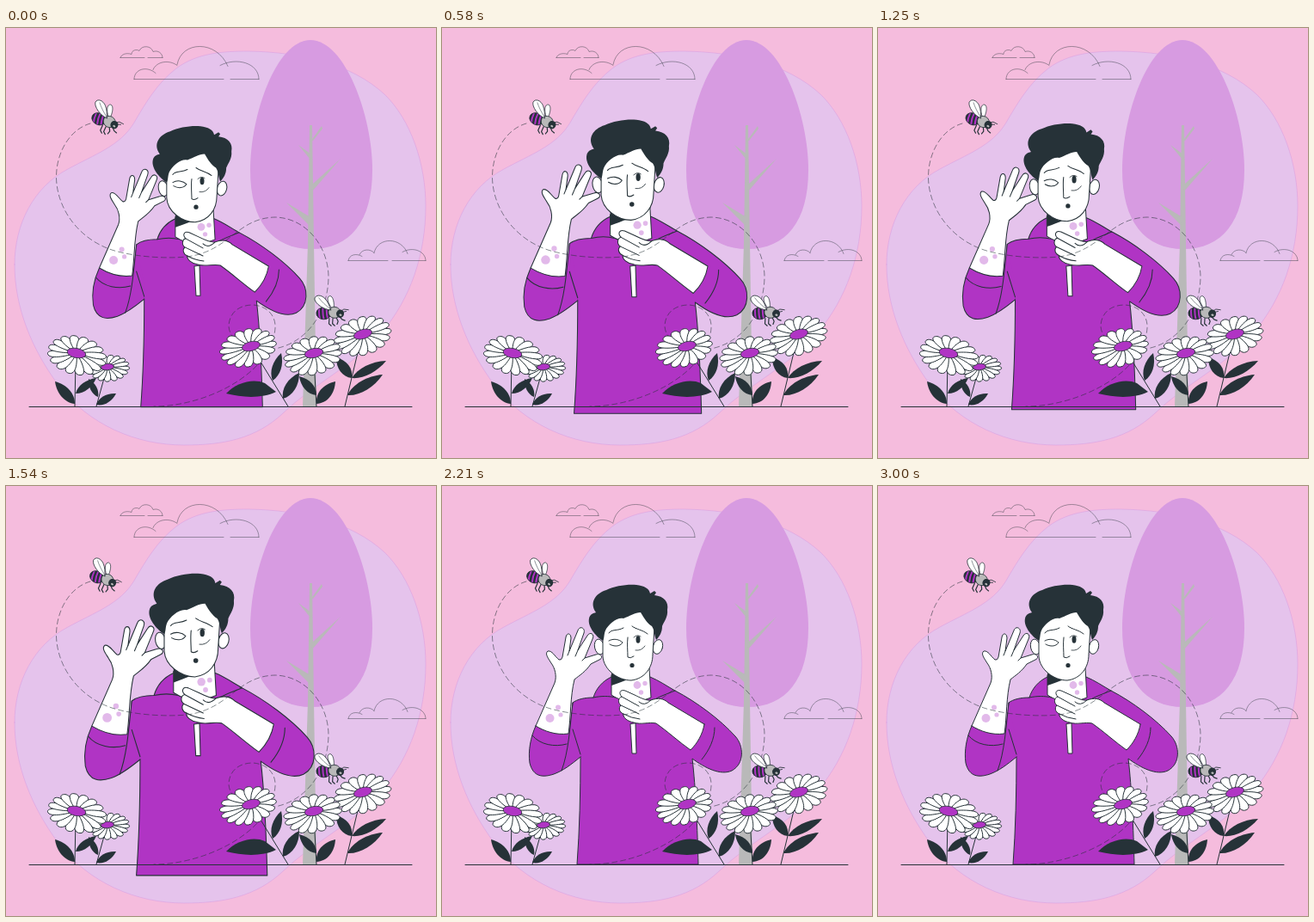
An HTML page with a canvas that plays this animation: 500 px wide and 500 px high, repeating every 3.04 s.

```html
<!DOCTYPE html>
<html lang="en">
<head>
<meta charset="utf-8">
<title>Allergy</title>
<style>
html, body { margin: 0; width: 100%; height: 100%; overflow: hidden; background: #f5bcdd; }
canvas { display: block; width: 100vw; height: 100vh; }
</style>
</head>
<body>
<canvas id="stage"></canvas>
<script>
const LOOP = 3040;
const DARK = '#263238', WHITE = '#fff', PURPLE = '#b034c4', LILAC = '#d79be1', RASH = '#e2b9ea', GREY = '#b9b9b9';
const canvas = document.getElementById('stage');
const ctx = canvas.getContext('2d');
const ratio = Math.max(1, window.devicePixelRatio || 1);
canvas.width = canvas.height = 500 * ratio;

function shape(d, fill, stroke, width = 1) {
  const p = new Path2D(d);
  if (fill) { ctx.fillStyle = fill; ctx.fill(p); }
  if (stroke) { ctx.strokeStyle = stroke; ctx.lineWidth = width; ctx.stroke(p); }
}
const line = (d, width = 1) => shape(d, null, DARK, width);

function oval(x, y, rx, ry, fill, rot = 0, width = 0) {
  ctx.beginPath();
  ctx.ellipse(x, y, rx, ry, rot, 0, Math.PI * 2);
  ctx.fillStyle = fill;
  ctx.fill();
  if (width) { ctx.strokeStyle = DARK; ctx.lineWidth = width; ctx.stroke(); }
}
const dot = (x, y, r, fill) => oval(x, y, r, r, fill);

// Piecewise linear value through [time, value] points
function track(points, t) {
  for (let i = 1; i < points.length; i++) {
    const [a, va] = points[i - 1], [b, vb] = points[i];
    if (t <= b) return va + (vb - va) * Math.max(0, t - a) / (b - a);
  }
  return points[points.length - 1][1];
}
const BEAT = [[0, 1], [300, 1.1], [900, 1], [1200, 1], [1500, 1.1], [1800, 1]];
const SHAKE = [0, -1, 2, -4, 4, -4, 4, -4, 2, -1, 0].map((x, i) => [i * 300, x]);

function backdrop() {
  ctx.fillStyle = '#f5bcdd';
  ctx.fillRect(0, 0, 500, 500);
  shape('M10 275C10 228 32 185 72 164C103 147 133 137 149 110C163 86 176 64 198 47C222 29 252 27 282 27' +
    'C344 28 402 42 440 77C471 107 488 158 488 207C488 264 470 315 437 354C406 392 357 414 322 448' +
    'C290 478 252 485 207 485C152 485 96 462 60 414C30 373 10 325 10 275Z', '#e5c3ec', LILAC, 0.5);
  ctx.save();
  ctx.translate(0, 0.5);
  ctx.globalAlpha = 0.42;
  line('M133 34C134 30 140 28 146 30C146 25 152 24 155 26C158 19 169 20 171 27C177 25 182 29 182 34M133 34H161M165 34H182');
  line('M149 59C149 47 164 43 174 52M171 48C175 38 190 36 199 43M199 42C204 14 245 13 258 44M249 43C268 33 294 40 294 59M149 59H253M261 59H294');
  line('M398 270C399 263 407 261 414 265M411 263C414 256 424 256 428 261M428 261C432 242 460 242 467 262M461 260C473 253 488 259 488 270M398 270H444M449 270H488');
  ctx.restore();
}

function tree() {
  shape('M354 14C394 14 426 102 426 165C426 225 400 257 355 257C310 257 284 225 284 165C284 102 314 14 354 14Z', LILAC);
  shape('M353 113H356L358 250L361 440H345L351 250Z', GREY);
  shape('M354 132L367 114L368 117L357 131Z', GREY);
  shape('M354 153L340 136L355 147Z', GREY);
  shape('M355 191L389 152L357 181Z', GREY);
  shape('M352 229L326 203L354 220Z', GREY);
}

function shirt() {
  shape('M197 222C186 227 179 236 176 246C166 246 157 248 152 252L150 290L161 315C161 355 160 400 157 440H298' +
    'C297 400 295 350 291 317C306 328 324 337 337 331C352 323 351 302 341 291C324 272 296 251 271 238C262 233 252 226 242 222Z',
    PURPLE, DARK);
  shape('M109 279C103 292 100 308 102 322C106 339 118 339 130 335C141 331 150 324 161 315L161 298L152 252L147 288Z', PURPLE);
  line('M109 279C103 292 100 308 102 322C106 339 118 339 130 335C141 331 150 324 161 315');
  line('M152 252C149 280 147 310 139 331');
  line('M152 283L161 312');
  line('M105 290C114 301 131 304 145 300');
  line('M176 246C185 244 194 244 202 246M271 238C261 242 252 245 246 249');
  line('M317 281C317 294 311 307 302 318');
  shape('M219 277L221 311H226L225 276Z', WHITE, DARK);
}

function face() {
  shape('M197 220L197 243C206 249 217 252 229 251L243 246L241 211Z', WHITE, DARK);
  shape('M197 216L216 225C210 227 204 230 197 232Z', DARK);
  oval(183, 187, 5.5, 9, WHITE, -0.2, 1);
  oval(251, 187, 5.5, 8.5, WHITE, 0.25, 1);
  shape('M187 168L187 198C188 214 205 226 220 226C236 224 245 211 245 196L247 164L231 140L200 145Z', WHITE, DARK);
  shape('M187 180C178 174 169 163 171 154C172 149 176 148 179 147C171 136 178 125 191 121C201 116 216 114 226 115' +
    'C235 116 241 119 242 125L247 122L249 124L247 127C258 128 264 135 262 144C263 152 258 158 256 163C256 170 253 175 249 179' +
    'C247 174 247 167 244 163C239 160 235 154 231 147C224 147 219 151 211 154C204 152 193 161 190 168C188 173 189 177 187 180Z', DARK);
  line('M194 171C197 166 204 169 211 165M221 163C226 167 233 167 239 172');
  line('M194 180C199 177 206 178 210 182C207 187 200 187 195 184');
  line('M216 176C215 184 216 192 216 199Q219 201 223 198');
  line('M223 176Q227 172 231 175M225 191Q232 192 236 186', 0.8);
  oval(228, 178.5, 2.5, 4.2, DARK);
  oval(221, 208.5, 2.6, 2.6, DARK);
  dot(227, 231.5, 4.4, RASH);
  dot(236, 229.5, 2.7, RASH);
  dot(231.5, 240, 2.7, RASH);
}

function hands() {
  shape('M109 279L131 229C134 221 131 211 127 206C124 201 119 195 123 192C128 191 131 198 136 202Q139 203 140 199' +
    'L144 176C145 170 150 171 150 177L148 192L158 168C160 162 167 165 165 171L158 191L169 174C172 169 178 172 175 178' +
    'L166 200L179 196C185 194 188 200 183 202L173 207C167 216 160 220 154 225C149 245 150 267 147 288C132 290 119 285 109 279Z',
    WHITE, DARK);
  line('M148 192L146 197M158 191L155 198M166 200L163 203');
  dot(125.5, 270, 5, RASH);
  dot(135, 257.5, 3, RASH);
  dot(138, 266, 2.6, RASH);
  shape('M305 277L263 252C258 247 251 246 243 249C238 250 230 246 224 243L213 238C207 236 205 241 209 245' +
    'C205 246 204 252 208 255C205 258 206 263 211 265C210 269 216 274 223 275C231 278 241 274 249 276' +
    'C262 285 276 298 289 307C297 299 303 289 305 277Z', WHITE, DARK);
  line('M209 245L229 256M208 255L229 265M211 265Q220 270 230 271M229 251Q235 257 243 249');
}

function man(scale) {
  ctx.save();
  ctx.translate(225, 277.5);
  ctx.scale(scale, scale);
  ctx.translate(-225, -277.5);
  shirt();
  face();
  hands();
  ctx.restore();
}

function trail() {
  ctx.save();
  ctx.globalAlpha = 0.55;
  ctx.setLineDash([6, 4]);
  line('M98 111C74 118 58 145 58.5 175C60 215 90 250 130 260C157 267 190 268 210 266C260 260 268 221 313 220' +
    'C350 221 375 255 375 290C374 338 342 373 302 374C272 374 259 359 259 346C260 330 272 322 287 322' +
    'C304 323 314 335 313 349C309 402 232 440 172 440');
  ctx.restore();
}

function leaf(x0, y0, x1, y1, w) {
  const dx = x1 - x0, dy = y1 - y0, len = Math.hypot(dx, dy);
  const nx = -dy / len * w, ny = dx / len * w;
  const side = s => [x0 + dx * 0.25 + nx * s, y0 + dy * 0.25 + ny * s, x0 + dx * 0.65 + nx * s, y0 + dy * 0.65 + ny * s];
  ctx.beginPath();
  ctx.moveTo(x0, y0);
  ctx.bezierCurveTo(...side(1), x1, y1);
  const [a, b, c, d] = side(-1);
  ctx.bezierCurveTo(c, d, a, b, x0, y0);
  ctx.fillStyle = DARK;
  ctx.fill();
}

// The ring of petal tips sits (ox, oy) away from the flower's heart
function flower(x, y, r, rot, ox, oy) {
  const count = 16, squash = 0.65, w = r * 0.2;
  for (let i = 0; i < count; i++) {
    const angle = (i + 0.4) * Math.PI * 2 / count;
    const tx = r * Math.cos(angle) + ox, ty = r * Math.sin(angle) + oy / squash;
    const len = Math.hypot(tx, ty);
    ctx.save();
    ctx.translate(x, y);
    ctx.rotate(rot);
    ctx.scale(1, squash);
    ctx.rotate(Math.atan2(ty, tx));
    ctx.beginPath();
    ctx.moveTo(0, 0);
    ctx.bezierCurveTo(len * 0.45, -w * 0.8, len, -w * 1.3, len, 0);
    ctx.bezierCurveTo(len, w * 1.3, len * 0.45, w * 0.8, 0, 0);
    ctx.restore();
    ctx.fillStyle = WHITE;
    ctx.fill();
    ctx.strokeStyle = DARK;
    ctx.lineWidth = 1;
    ctx.stroke();
  }
  oval(x, y, r * 0.32, r * 0.16, PURPLE, rot, 0.8);
}

function garden() {
  line('M81 385L80 440M116 400L105 440M288 375L328 440M358 385L361 440M412 365L394 440');
  leaf(80, 437, 57, 411, 8);
  leaf(81, 425, 105, 407, 6);
  leaf(107, 429, 96, 408, 5);
  leaf(105, 438, 128, 425, 6);
  shape('M256 425C268 412 288 407 301 413L314 423C298 431 275 430 256 425Z', DARK);
  leaf(310, 410, 320, 378, 7);
  leaf(322, 431, 341, 401, 8);
  leaf(361, 427, 341, 405, 7);
  leaf(361, 437, 383, 411, 9);
  leaf(402, 407, 384, 383, 8);
  leaf(402, 407, 442, 387, 7);
  leaf(397, 427, 438, 403, 8);
  flower(118, 394, 23.5, -0.1, 2, 2);
  flower(82, 378, 34.5, 0.2, 1, 2.5);
  flower(285, 370, 33.5, -0.25, -4, 1);
  flower(415, 356, 34, -0.28, -1, 2);
  flower(358, 378, 34, -0.2, -2, 3);
}

function bee(x, y, rot) {
  ctx.save();
  ctx.translate(x, y);
  ctx.rotate(rot);
  line('M-7 7L-9 13L-7 16M-3 8L-5 14L-3 17M1 8L2 13L0 16M5 8L7 12L10 14', 1.2);
  line('M9 2L12 1L17 3M9 4L14 4', 0.8);
  shape('M-1 -3C-5 -12 -4 -18 0 -18C4 -17 3 -8 1 -3Z', WHITE, DARK, 0.7);
  oval(-12, 0, 8.5, 6.8, PURPLE, 0.35, 0.8);
  ctx.save();
  ctx.beginPath();
  ctx.ellipse(-12, 0, 8.5, 6.8, 0.35, 0, Math.PI * 2);
  ctx.clip();
  for (let i = 0; i < 4; i++) {
    const sx = -19 + i * 4.5;
    line(`M${sx + 2} -9Q${sx - 2} 0 ${sx - 1} 12`, 2.5);
  }
  ctx.restore();
  oval(0.5, 2, 7.2, 6.5, GREY, 0.4, 0.8);
  shape('M-3 -2C-11 -4 -19 -14 -18 -19C-16 -24 -9 -22 -6 -16C-4 -12 -3 -7 -3 -2Z', WHITE, DARK, 0.8);
  line('M-3 -3C-7 -8 -11 -14 -13 -19', 0.5);
  oval(6.5, 5, 4.5, 4.8, DARK, 0.4);
  oval(6.5, 6.5, 1.6, 1.2, GREY, 0.5);
  ctx.restore();
}

function draw(now) {
  const t = now % LOOP;
  const phase = 12 + t * 1.006;
  ctx.setTransform(canvas.width / 500, 0, 0, canvas.height / 500, 0, 0);
  ctx.lineJoin = ctx.lineCap = 'round';
  backdrop();
  tree();
  man(track(BEAT, phase));
  trail();
  line('M27 440.5H472', 1);
  garden();
  bee(120 + track(SHAKE, phase), 107, 0.1);
  bee(381, 329, -0.25);
}

const start = performance.now();
function frame() {
  draw(performance.now() - start);
  requestAnimationFrame(frame);
}
frame();
</script>
</body>
</html>
```
